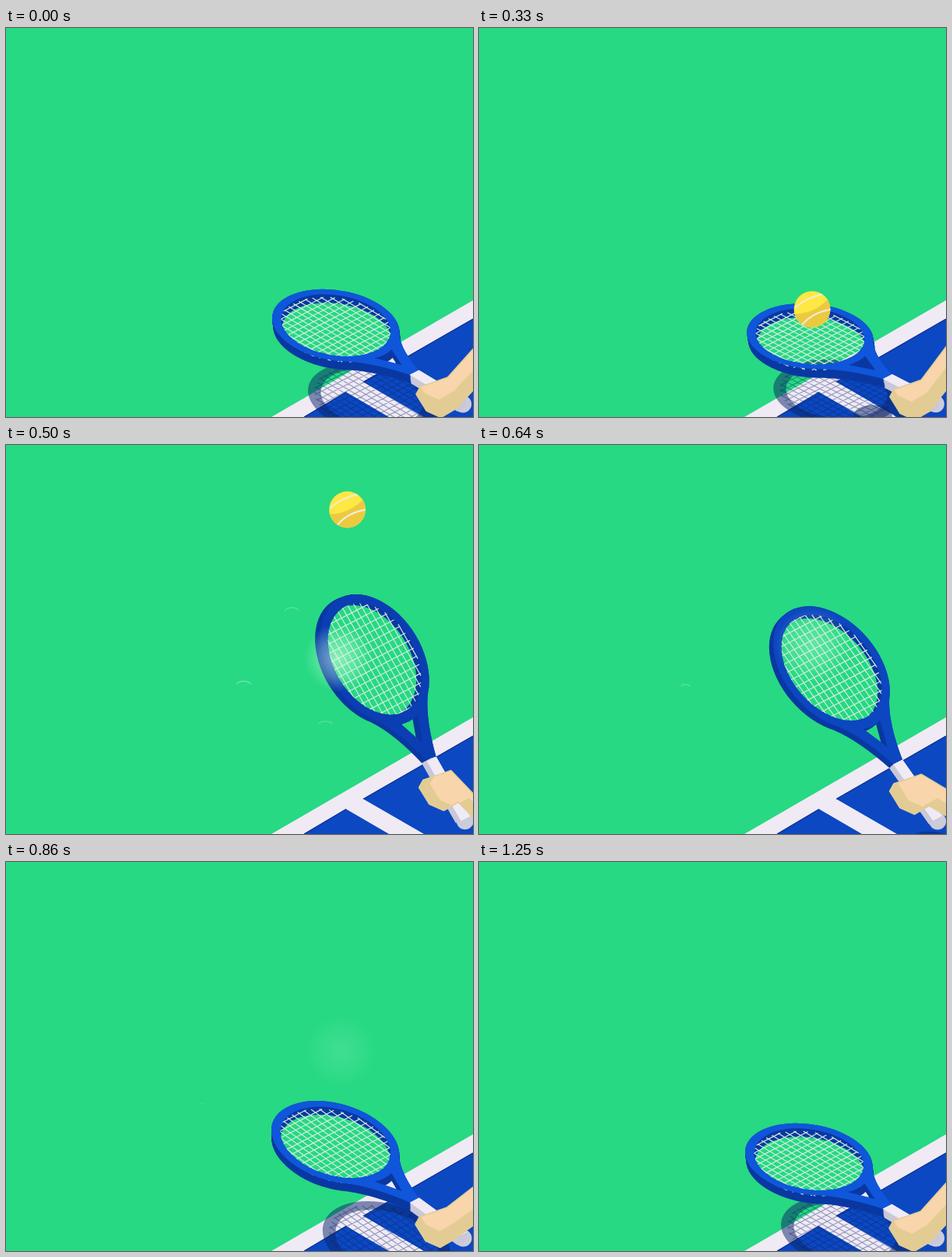
These frames come from a looping animation (600 by 500 pixels, 2 s). An HTML page with a canvas:

```html
<!DOCTYPE html>
<html lang="en">
<head>
<meta charset="utf-8">
<title>Tennis swing</title>
<style>
  html, body { margin: 0; overflow: hidden; background: #26d982; }
  canvas { display: block; }
</style>
</head>
<body>
<canvas id="stage" width="600" height="500"></canvas>
<script>
const ctx = document.getElementById('stage').getContext('2d');
const LOOP = 2000, HIT = 350;
const SHADOW = 'rgba(10,36,104,.5)';

// Screen directions of the racket at zero tilt: along, across and down
const ALONG = [62, 45.8], ACROSS = [-54, 28], DOWN = [0, 65.2];

const clamp = v => Math.max(0, Math.min(1, v));
const mix = (a, b, k) => a + (b - a) * k;
const progress = (t, from, to) => clamp((t - from) / (to - from));
const ease = (t, from, to) => {
  const k = progress(t, from, to);
  return k * k * (3 - 2 * k);
};
const add = (a, b, k = 1) => [a[0] + b[0] * k, a[1] + b[1] * k];
const scale = (a, k) => [a[0] * k, a[1] * k];

const tiltAt = t => -.13 - .075 * ease(t, 0, 230) + .975 * ease(t, 330, 500) - .9 * ease(t, 500, 970);

// The racket turns about its butt in the plane of ALONG and DOWN
function poseAt(t) {
  const tilt = tiltAt(t), sin = Math.sin(tilt), cos = Math.cos(tilt);
  const axis = add(scale(ALONG, cos), DOWN, sin);
  const depth = scale(add(scale(DOWN, cos), ALONG, -sin), .155);
  const butt = [587.5 + 6 * sin, 480.5 + 3 * sin];
  const head = add(butt, axis, -2.65);
  const shadow = add(head, [67 + 162 * sin, 131 + 291 * sin]);
  return { tilt, sin, axis, depth, butt, head, shadow };
}

function polygon(...points) {
  const path = new Path2D();
  for (const p of points) path.lineTo(...p);
  path.closePath();
  return path;
}

function ellipse([x, y], rx, ry = rx) {
  const path = new Path2D();
  path.ellipse(x, y, rx, ry, 0, 0, 2 * Math.PI);
  return path;
}

function fill(path, color) {
  ctx.fillStyle = color;
  ctx.fill(path, 'evenodd');
}

function line(path, color, width) {
  ctx.strokeStyle = color;
  ctx.lineWidth = width;
  ctx.stroke(path);
}

// Racket parts, with the head as a unit circle
function makeFrame(hole) {
  const p = new Path2D();
  p.arc(0, 0, 1, .65, 2 * Math.PI - .65);
  p.quadraticCurveTo(1.1, -.3, 1.66, -.1);
  p.lineTo(1.66, .1);
  p.quadraticCurveTo(1.1, .3, .8, .605);
  p.closePath();
  p.moveTo(hole, 0);
  p.arc(0, 0, hole, 0, 2 * Math.PI);
  p.moveTo(.99, -.2);
  p.quadraticCurveTo(1.04, 0, .99, .2);
  p.lineTo(1.38, 0);
  p.closePath();
  return p;
}
const frame = makeFrame(.86), shadowFrame = makeFrame(.8);
const grip = polygon([1.64, -.11], [2.62, -.11], [2.62, .11], [1.64, .11]);
const strings = new Path2D();
for (let i = -7; i <= 7; i++) {
  const k = i * .122, w = Math.sqrt(.81 - k * k);
  strings.moveTo(-w, k); strings.lineTo(w, k);
  strings.moveTo(k, -w); strings.lineTo(k, w);
}

function drawCourt() {
  fill(polygon([0, 0], [600, 0], [600, 500], [0, 500]), '#26d982');
  fill(polygon([341, 500], [600, 350], [600, 500]), '#f0eaf5');
  const left = [[383, 500], [437, 468], [492, 500]];
  const right = [[459, 455], [600, 374], [600, 500], [537, 500]];
  for (const court of [left, right]) {
    fill(polygon(...court), '#0b48c2');
    line(polygon(court[0], court[1]), '#0a2f93', 1.3);
  }
}

function drawRacket({ tilt, axis, depth, butt, head, shadow }) {
  const place = (part, at) => {
    const path = new Path2D();
    path.addPath(part, new DOMMatrix([...axis, ...ACROSS, ...at]));
    return path;
  };
  const extrude = (part, color) => {
    for (let k = 1; k > 0; k -= .1) fill(place(part, add(head, depth, k)), color);
  };
  fill(place(shadowFrame, shadow), SHADOW);
  line(place(strings, shadow), 'rgba(10,36,104,.4)', 1.2);

  extrude(frame, '#0a38a2');
  line(place(strings, add(head, depth, .5)), '#d3ebdf', 1.2);
  const dark = clamp((tilt - .25) * 2);
  fill(place(frame, head), `rgb(${mix(15, 10, dark)},${mix(86, 62, dark)},${mix(218, 178, dark)})`);

  fill(ellipse(add(butt, depth, .3), 11), '#cccbda');
  extrude(grip, '#c9c8d8');
  fill(place(grip, head), '#f0eaf5');
}

function drawHand({ sin, axis, depth, butt }) {
  const fist = add(add(butt, axis, -.53), depth, 1.3);
  const elbow = 434 + 60 * sin, half = 24 - 14 * sin;
  const knuckles = [[12, -25], [-5, -19], [-23, -13], [-28, -4], [-23, 4], [-15, 17], [3, 25], [22, 14]];
  const outline = polygon([612, elbow - half], ...knuckles.map(p => add(fist, p)), [612, elbow + half]);
  ctx.save();
  ctx.lineJoin = 'round';
  fill(outline, '#e2cc94');
  line(outline, '#e2cc94', 3);
  ctx.clip(outline);
  ctx.translate(...scale(depth, -2));
  fill(outline, '#f9d5ab');
  ctx.restore();
}

function ballAt(t) {
  if (t < HIT) return [428, t < 220 ? mix(-35, 237, t / 220) : mix(237, 383, progress(t, 220, HIT))];
  const k = (t - HIT) / 150;
  return [mix(428, 438.5, k), mix(383, 85, k)];
}

function drawBallShadow(t) {
  const [x, y] = ballAt(t), rise = 361 - y;
  fill(ellipse([x + 78 + rise * .3, 499 + rise * .6], 25, 14), SHADOW);
}

function drawBall(t) {
  ctx.save();
  ctx.translate(...ballAt(t));
  const ball = ellipse([0, 0], 23.4);
  fill(ball, '#fee843');
  ctx.clip(ball);
  fill(new Path2D('M-24 6 Q4 6 24 -17 V24 H-24Z'), '#ebca40');
  const seam = t < 275 ? 'M-24 -5 C-12 -6 -3 6 -6 24' : 'M-22 -2 Q-8 -15 15 -20 M-13 20 Q0 4 24 0';
  line(new Path2D(seam), '#f3ecdb', 2);
  ctx.restore();
}

function drawImpact(t) {
  const age = t - 370;
  if (age < 0 || age > 650) return;
  const x = mix(426, 430, progress(t, 500, 750));
  const y = 345 - 71 * progress(t, 370, 500) - 31 * progress(t, 500, 750);
  const radius = Math.min(48, 20 + age * .18);
  const alpha = .62 * Math.exp(-Math.max(0, age - 100) / 270) * clamp((650 - age) / 150);
  const glow = ctx.createRadialGradient(x, y, 0, x, y, radius);
  glow.addColorStop(0, `rgba(225,255,235,${alpha})`);
  glow.addColorStop(.55, `rgba(190,250,215,${alpha * .6})`);
  glow.addColorStop(1, 'rgba(170,245,200,0)');
  fill(ellipse([x, y], radius), glow);

  const spread = 1 - Math.exp(-age / 115), size = Math.max(3, 12 - age * .022);
  for (const [dx, dy, life] of [[-85, -127, 280], [-176, 12, 600], [-22, 88, 260]]) {
    const spark = new Path2D();
    spark.ellipse(425 + dx * spread, 300 + dy * spread, size, size / 2, 0, 3.3, 6.1);
    line(spark, `rgba(215,250,228,${.5 * clamp(1 - age / life)})`, 1.5);
  }
}

function draw() {
  const t = performance.now() % LOOP;
  const pose = poseAt(t), ballVisible = t < 575;
  drawCourt();
  if (ballVisible) drawBallShadow(t);
  drawRacket(pose);
  drawHand(pose);
  drawImpact(t);
  if (ballVisible) drawBall(t);
  requestAnimationFrame(draw);
}
draw();
</script>
</body>
</html>
```
